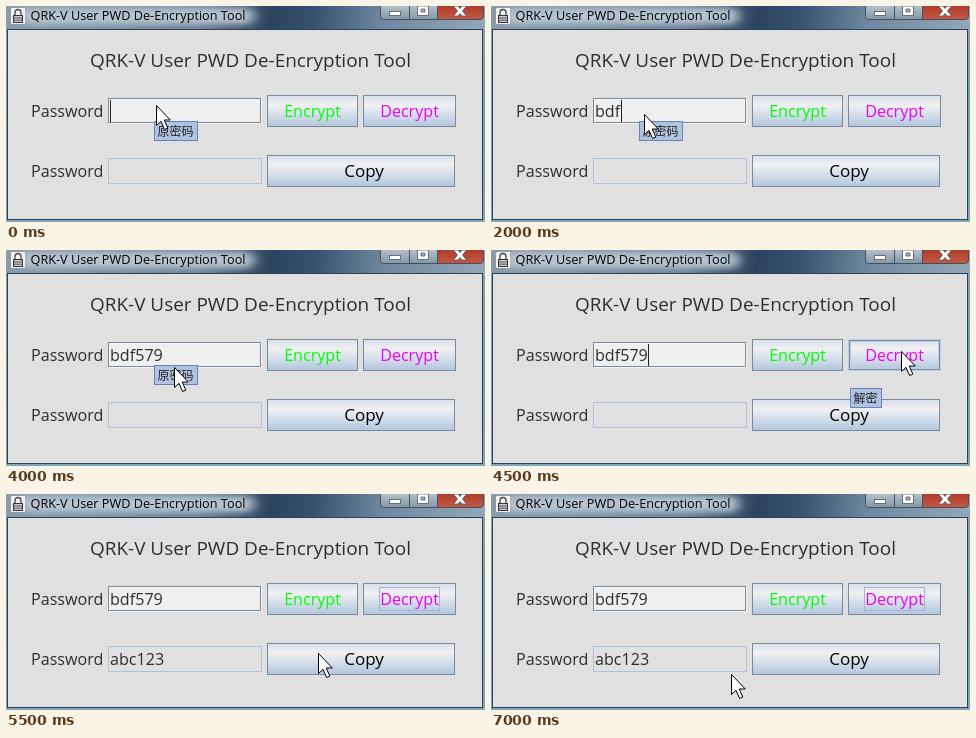
Recreate the animation shown at these times as an HTML page. Size 479 by 216 pixels, loop 8 s.

```html
<!DOCTYPE html>
<html lang="en">
<head>
<meta charset="utf-8">
<title>Password tool</title>
<style>
html, body { margin: 0; width: 100%; height: 100%; overflow: hidden; background: #e0e0e0; }
svg { display: block; width: 479px; height: 216px; }
text { font-family: "Open Sans", "Noto Sans", sans-serif; font-size: 16.1px; fill: #2e2e2e; white-space: pre; }
.tip text { font-family: "Noto Sans CJK SC", "Noto Sans CJK", sans-serif; font-size: 12px; fill: #222; }
.mid { text-anchor: middle; }
.edge { shape-rendering: crispEdges; }
</style>
</head>
<body>
<svg viewBox="0 0 479 216">
  <defs>
    <linearGradient id="bar" gradientUnits="userSpaceOnUse" x1="0" y1="0" x2="479" y2="60">
      <stop offset="0" stop-color="#8c9ba8"/>
      <stop offset=".4" stop-color="#6d8298"/>
      <stop offset=".55" stop-color="#2b435e"/>
      <stop offset=".64" stop-color="#37536f"/>
      <stop offset=".78" stop-color="#7089a0"/>
      <stop offset="1" stop-color="#94a9b8"/>
    </linearGradient>
    <linearGradient id="frame" x2="0" y2="1">
      <stop offset="0" stop-color="#8ea3b2"/>
      <stop offset=".5" stop-color="#6fa0ae"/>
      <stop offset="1" stop-color="#7fa6b6"/>
    </linearGradient>
    <linearGradient id="face" x2="0" y2="1">
      <stop offset="0" stop-color="#d6e0ea"/>
      <stop offset=".3" stop-color="#f0f0f2"/>
      <stop offset=".6" stop-color="#d5dfea"/>
      <stop offset="1" stop-color="#b2c6dd"/>
    </linearGradient>
    <linearGradient id="glass" x2="0" y2="1">
      <stop offset="0" stop-color="#b4c0ca"/>
      <stop offset="1" stop-color="#8497a6"/>
    </linearGradient>
    <linearGradient id="red" x2="0" y2="1">
      <stop offset="0" stop-color="#b03c2c"/>
      <stop offset="1" stop-color="#c65a44"/>
    </linearGradient>
    <filter id="blur" x="-20%" y="-100%" width="140%" height="300%">
      <feGaussianBlur stdDeviation="6 3"/>
    </filter>
  </defs>

  <rect width="479" height="216" fill="url(#frame)"/>
  <rect width="479" height="24" fill="url(#bar)"/>
  <rect x="14" y="2" width="234" height="16" rx="8" fill="#b8c5d0" filter="url(#blur)"/>
  <rect class="edge" x="1.5" y="23.5" width="475" height="190" fill="#e0e0e0" stroke="#2a4258"/>

  <rect x="5" y="2" width="14" height="16" rx="1" fill="#f2f2f2"/>
  <path d="M9 9V6.5a3 3 0 0 1 6 0V9" fill="none" stroke="#444" stroke-width="1.3"/>
  <rect x="7.5" y="9.5" width="9" height="7" fill="#ccc" stroke="#333"/>
  <path d="M8 12H16M8 14.2H16" stroke="#555"/>
  <text x="24.5" y="14" style="font-size:12.7px;fill:#000">QRK-V User PWD De-Encryption Tool</text>

  <g stroke="#42515f">
    <path d="M374.5 0V10.5Q374.5 13.5 377.5 13.5H403.5V0" fill="url(#glass)"/>
    <path d="M403.5 0V13.5H431.5V0" fill="url(#glass)"/>
    <path d="M431.5 0V13.5H474Q477.5 13.5 477.5 10V0" fill="url(#red)"/>
  </g>
  <g fill="#fff" stroke="#4a5868" stroke-width=".8">
    <rect x="383.5" y="5.5" width="11" height="4"/>
    <path fill-rule="evenodd" d="M411.5 0H422.5V9.5H411.5ZM415 3V6H419V3Z"/>
    <path d="M447.5 10L451.5 5L447.5 0H452L454 2.5L456 0H460.5L456.5 5L460.5 10H456L454 7.5L452 10Z"/>
  </g>

  <text x="84" y="61" style="font-size:18.95px">QRK-V User PWD De-Encryption Tool</text>
  <text x="25" y="111">Password</text>
  <text x="25" y="171">Password</text>

  <g class="edge" fill="none">
    <rect x="103.5" y="93.5" width="152" height="24" fill="#efefef" stroke="#f4f4f4"/>
    <rect x="102.5" y="92.5" width="152" height="24" stroke="#7a8a99"/>
    <rect x="102.5" y="152.5" width="153" height="25" stroke="#b0c0dc"/>
    <g fill="url(#face)" stroke="#7a8a99">
      <rect x="261.5" y="89.5" width="90" height="31"/>
      <rect x="357.5" y="89.5" width="92" height="31"/>
      <rect x="261.5" y="149.5" width="187" height="31"/>
    </g>
    <g id="hover" stroke="#b8cfe5">
      <rect x="357.5" y="89.5" width="92" height="31"/>
      <rect x="358.5" y="90.5" width="90" height="29" stroke="#7a8a99"/>
      <rect x="359.5" y="91.5" width="88" height="27"/>
    </g>
    <rect id="focus" x="373.5" y="93.5" width="60" height="23" stroke="#a3b8cc"/>
  </g>
  <g class="mid">
    <text x="306.5" y="111" style="fill:#0f0">Encrypt</text>
    <text x="403.5" y="111" style="fill:#f000f0">Decrypt</text>
    <text x="358" y="171" style="font-size:17px;fill:#000">Copy</text>
  </g>

  <text id="entry" x="104" y="111"></text>
  <text id="result" x="104" y="171">abc123</text>
  <rect id="caret" class="edge" y="94" width="1" height="22" fill="#222"/>

  <g id="tipField" class="tip">
    <rect class="edge" x="148.5" y="115.5" width="43" height="19" fill="#b0c2e0" stroke="#6382bf"/>
    <text x="151.5" y="130">原密码</text>
  </g>
  <g id="tipButton" class="tip">
    <rect class="edge" x="359.5" y="138.5" width="31" height="19" fill="#b0c2e0" stroke="#6382bf"/>
    <text x="362.5" y="153">解密</text>
  </g>

  <path id="pointer" d="M.5 .5V20.5L5 16.3L8.6 24.5L11.8 23.1L8.2 15H14.3Z" fill="#fff" stroke="#000"/>
</svg>
<script>
const LOOP = 8000;
const CARET_X = [104, 113, 122, 130, 139, 148, 157];
const WORD = "bdf579";

// Pointer stops: time, x, y
const stops = [
  [0, 150, 99], [500, 153, 99], [1000, 153, 108], [4000, 168, 117],
  [4500, 410, 101], [5000, 408, 108], [5500, 312, 159],
  [6000, 156, 171], [6500, 157, 177], [7000, 240, 180]
];
// Typing: time, characters entered
const typing = [[0, 0], [1500, 1], [2000, 3], [3000, 4], [3500, 6]];
// Times at which the blinking caret is hidden
const blinkOff = [500, 2500, 4000, 5000];

const el = id => document.getElementById(id);
const show = (id, on) => el(id).setAttribute("visibility", on ? "visible" : "hidden");
const latest = (list, t) => list.filter(item => item[0] <= t).pop();

function draw(t) {
  const [, x, y] = latest(stops, t);
  const typed = latest(typing, t)[1];
  const onButton = t >= 4500 && t < 5500;
  const done = t >= 5500;

  el("pointer").setAttribute("transform", `translate(${x} ${y})`);
  el("entry").textContent = WORD.slice(0, typed);
  el("caret").setAttribute("x", CARET_X[typed]);
  show("caret", !done && !blinkOff.includes(Math.floor(t / 500) * 500));
  show("tipField", t < 4500);
  show("tipButton", onButton);
  show("hover", onButton);
  show("focus", done);
  show("result", done);
}

const start = performance.now();
function tick() {
  draw((performance.now() - start) % LOOP);
  requestAnimationFrame(tick);
}
tick();
</script>
</body>
</html>
```
